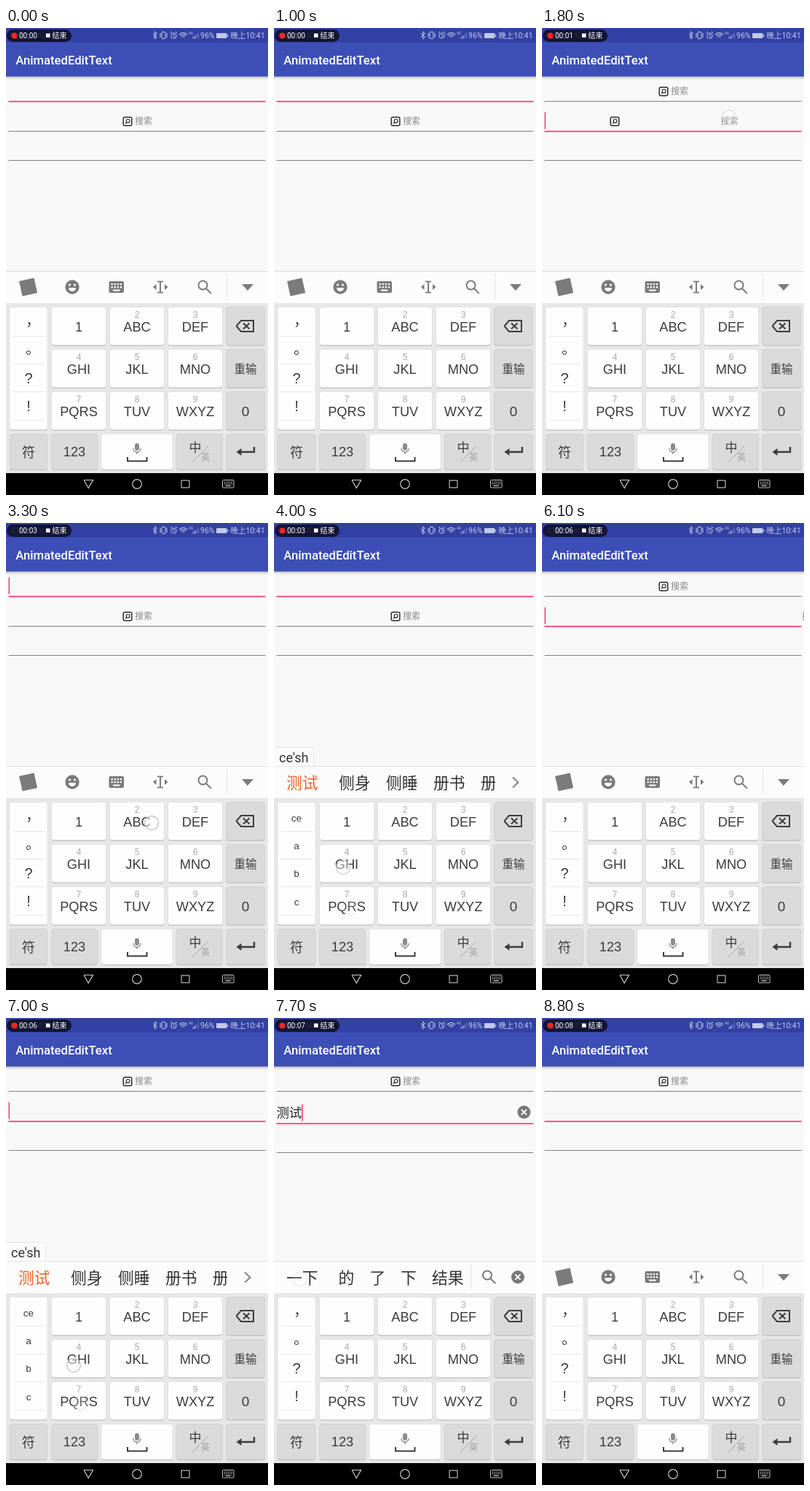
Recreate the animation shown at these times as an HTML page with a canvas. Size 360 px wide and 640 px high, loop 8.9 s.

```html
<!DOCTYPE html>
<html lang="zh-CN">
<head>
<meta charset="utf-8">
<title>AnimatedEditText</title>
<style>
html, body { margin: 0; width: 100%; height: 100%; overflow: hidden; background: #f8f8f8; }
canvas { display: block; width: 360px; height: 640px; }
</style>
</head>
<body>
<canvas id="stage"></canvas>
<script>
const LOOP = 8900, HINT_TIME = 500;
const CJK = '"Noto Sans CJK SC", "Noto Sans CJK", sans-serif';
const ARIAL = '"Liberation Sans", "Noto Sans CJK SC", "Noto Sans CJK", sans-serif';
const ROBOTO = 'Roboto, "Noto Sans CJK SC", "Noto Sans CJK", sans-serif';
const PINK = '#f83f7e', DARK = '#3c3c3c', ICON = '#7b7b7b';

const canvas = document.getElementById('stage');
const ctx = canvas.getContext('2d');
const ratio = window.devicePixelRatio || 1;
canvas.width = 360 * ratio;
canvas.height = 640 * ratio;

// Each tap: release time, effect, touch position, field index
const taps = [
  [1590, 'focus', 257, 122, 1],
  [2200, 'focus', 236, 87, 0],
  [3360, 'key', 200, 411],
  [3560, 'key', 266, 413],
  [3760, 'key', 104, 528],
  [3950, 'key', 95, 472],
  [4400, 'pick', 28, 360],
  [5050, 'clear', 343, 88],
  [5620, 'focus', 250, 126, 1],
  [6420, 'key', 190, 412],
  [6610, 'key', 262, 413],
  [6800, 'key', 102, 528],
  [6980, 'key', 93, 476],
  [7460, 'pick', 36, 358],
  [8000, 'clear', 343, 128]
];

// What the input method offers after 1 to 4 keys
const phrases = ['测试', '侧身', '侧睡', '册书', '册'];
const composing = [
  { typed: 'a', words: ['啊', '不', '才', '从', '把'], side: ['a', 'b', 'c', '2'] },
  { typed: 'ce', words: ['测', '册', '侧', '策', '厕'], side: ['ce', 'a', 'b', 'c'] },
  { typed: "ce's", words: phrases, side: ['ce', 'a', 'b', 'c'] },
  { typed: "ce'sh", words: phrases, side: ['ce', 'a', 'b', 'c'] }
];

function stateAt(t) {
  const s = { focus: 0, focusedAt: -1e4, blinkFrom: 200, keys: 0, text: ['', '', ''], suggest: false };
  for (const [at, effect, , , field] of taps) {
    if (at > t) break;
    if (effect === 'key') { s.keys++; continue; }
    s.blinkFrom = at;
    if (effect === 'focus') { s.focus = field; s.focusedAt = at; }
    if (effect === 'pick') { s.text[s.focus] = '测试'; s.keys = 0; s.suggest = true; }
    if (effect === 'clear') { s.text[s.focus] = ''; s.suggest = false; }
  }
  return s;
}

function rect(x, y, w, h, color) {
  ctx.fillStyle = color;
  ctx.fillRect(x, y, w, h);
}
function roundRect(x, y, w, h, r, fill, stroke, width = 1) {
  ctx.beginPath();
  ctx.roundRect(x, y, w, h, r);
  paint(fill, stroke, width);
}
function circle(x, y, r, fill, stroke, width = 1) {
  ctx.beginPath();
  ctx.arc(x, y, r, 0, Math.PI * 2);
  paint(fill, stroke, width);
}
function path(points, fill, stroke, width = 1) {
  ctx.beginPath();
  for (let i = 0; i < points.length; i += 2) ctx.lineTo(points[i], points[i + 1]);
  if (fill) ctx.closePath();
  paint(fill, stroke, width);
}
function paint(fill, stroke, width) {
  if (fill) { ctx.fillStyle = fill; ctx.fill(); }
  if (stroke) { ctx.strokeStyle = stroke; ctx.lineWidth = width; ctx.stroke(); }
}
// y is the vertical middle of the glyphs
function text(str, x, y, size, color, align = 'center', family = ARIAL, weight = 400) {
  ctx.font = `${weight} ${size}px ${family}`;
  ctx.textAlign = align;
  ctx.fillStyle = color;
  ctx.fillText(str, x, y + size * 0.365);
}
function magnifier(x, y, r, color, width) {
  circle(x, y, r, null, color, width);
  path([x + r * 0.7, y + r * 0.7, x + r * 1.9, y + r * 1.9], null, color, width);
}
function closeIcon(x, y, r) {
  circle(x, y, r, '#777');
  const d = r * 0.4;
  path([x - d, y - d, x + d, y + d], null, '#fff', 2);
  path([x - d, y + d, x + d, y - d], null, '#fff', 2);
}

function drawStatusBar(t) {
  const pale = '#c3c9e9';
  rect(0, 0, 360, 20, '#3341a4');
  text('中国', 5, 10.5, 10.5, pale, 'left', CJK);
  text('40', 43, 10.5, 10.5, pale, 'left', ROBOTO);
  roundRect(1, 2, 89, 17, 8.5, 'rgba(13,15,34,.86)');
  const clock = t - 50;
  if ((clock + 1000) % 1000 >= 600) circle(11.5, 10.5, 4, '#f5291f');
  const seconds = Math.max(0, Math.floor(clock / 1000));
  text('00:0' + seconds, 18, 10.5, 10, '#fff', 'left', ROBOTO);
  rect(55, 7.5, 5.5, 5.5, '#fff');
  text('结束', 63.5, 10.5, 10, '#fff', 'left', CJK);

  path([202, 7.5, 207.5, 12.5, 204.7, 15, 204.7, 5, 207.5, 7.5, 202, 12.5], null, pale);
  roundRect(214, 5.5, 5, 9, 1, null, pale);
  path([212, 7, 212, 13], null, pale);
  path([221, 7, 221, 13], null, pale);
  circle(230.5, 10.5, 3.7, null, pale);
  path([230.5, 8, 230.5, 10.8, 232.5, 11.5], null, pale);
  path([226, 7, 228, 5], null, pale);
  path([233, 5, 235, 7], null, pale);
  for (const r of [2.5, 5, 7.5]) {
    ctx.beginPath();
    ctx.arc(243.5, 14, r, -Math.PI * 0.77, -Math.PI * 0.23);
    paint(null, pale, 1.2);
  }
  text('4G', 251, 7.5, 5, pale, 'left', ROBOTO);
  for (let i = 0; i < 4; i++) rect(256.5 + i * 2.4, 12.5 - i * 2, 1.3, 2 + i * 2, i < 2 ? pale : '#6974bf');
  text('96%', 267, 10.5, 10.5, pale, 'left', ROBOTO);
  roundRect(289, 7, 14.5, 7, 1, pale);
  rect(304, 9, 1.3, 3, pale);
  text('晚上10:41', 308.5, 10.5, 10.5, pale, 'left', ROBOTO);
}

function drawAppBar() {
  const shade = ctx.createLinearGradient(0, 66, 0, 71);
  shade.addColorStop(0, 'rgba(0,0,0,.22)');
  shade.addColorStop(1, 'rgba(0,0,0,0)');
  rect(0, 66, 360, 5, shade);
  rect(0, 20, 360, 46.5, '#3c4fb6');
  text('AnimatedEditText', 13.3, 44, 16.67, '#fff', 'left', ROBOTO, 500);
}

function drawHint(y, split) {
  const x = 167 - 177 * split;
  roundRect(x - 5.8, y - 5.8, 11.6, 11.6, 2, null, '#2e2e2e', 1.5);
  circle(x + 0.6, y - 0.6, 2.4, null, '#2e2e2e', 1.2);
  path([x - 1.2, y + 1.2, x - 3, y + 3], null, '#2e2e2e', 1.3);
  text('搜索', 177 + 181 * split, y, 12, '#898989', 'left', CJK);
}

function drawFields(t, s) {
  let shift = 0;
  [100, 141, 181].forEach((base, i) => {
    const focused = s.focus === i, value = s.text[i];
    if (value) shift = 3;
    const line = base + shift;
    if (focused) rect(3.5, line - 0.2, 353, 1.8, PINK);
    else rect(3.5, line, 353, 1, '#818181');

    if (value) {
      text(value, 3.5, line - 14.5, 17.3, '#262626', 'left', CJK);
      closeIcon(343.5, line - 15, 9);
    } else if (i < 2) {
      const p = focused ? Math.min(1, (t - s.focusedAt) / HINT_TIME) : 0;
      if (p < 1) drawHint(line - 13, (1 - Math.cos(Math.PI * p)) / 2);
    }
    const phase = (t - s.blinkFrom + 1000) % 1000;
    if (focused && phase < 500) rect(value ? 38 : 3.5, line - 25.5, 1.6, 23, PINK);
  });
}

function drawToolbar() {
  ctx.save();
  ctx.translate(30.5, 355);
  ctx.rotate(-0.22);
  rect(-10.5, -10.5, 21, 21, ICON);
  ctx.restore();

  circle(91, 355, 9.7, ICON);
  circle(87.5, 352, 1.6, '#fff');
  circle(94.5, 352, 1.6, '#fff');
  ctx.beginPath();
  ctx.arc(91, 356, 5, 0, Math.PI);
  paint('#fff');

  roundRect(141.5, 347, 20.5, 16, 2, ICON);
  for (let row = 0; row < 2; row++)
    for (let col = 0; col < 4; col++) rect(144.5 + col * 4.1, 350 + row * 4, 2.3, 2.2, '#fff');
  rect(147, 358.5, 9.5, 2, '#fff');

  path([212, 348, 212, 362], null, ICON, 2);
  for (const y of [347.5, 362.5]) path([208, y, 216, y], null, ICON, 1.8);
  path([202, 355, 206.5, 351, 206.5, 359], ICON);
  path([222.5, 355, 218, 351, 218, 359], ICON);

  magnifier(270.5, 352.5, 6, ICON, 2);
  rect(303, 337, 1, 36, '#e2e2e2');
  path([324, 351, 340, 351, 332, 360], ICON);
}

function drawWords(words, xs, firstColor, right) {
  ctx.save();
  ctx.beginPath();
  ctx.rect(0, 334, right, 43);
  ctx.clip();
  words.forEach((word, i) => text(word, xs[i], 356, 21.8, i ? '#333' : firstColor, 'left', CJK));
  ctx.restore();
}

function drawInputBar(s) {
  rect(0, 333, 360, 44, '#fcfcfc');
  rect(0, 333, 360, 1, '#dedede');
  if (s.keys) {
    const { typed, words } = composing[s.keys - 1];
    ctx.font = `18px ${ROBOTO}`;
    const width = ctx.measureText(typed).width + 14;
    roundRect(-3, 307.5, width + 3, 26, 3, '#fbfbfb', '#e6e6e6');
    text(typed, 7, 321, 18, '#333', 'left', ROBOTO);
    const wide = words[0].length > 1;
    drawWords(words, wide ? [17, 89, 154, 219, 284] : [17, 67, 117, 167, 217], '#ef612b', 304);
    path([328, 348.5, 335.5, 355.5, 328, 362.5], null, '#858585', 2);
  } else if (s.suggest) {
    drawWords(['一下', '的', '了', '下', '结果'], [17, 88.5, 131.5, 174, 217], '#333', 270);
    rect(270, 337, 1, 36, '#e2e2e2');
    magnifier(293, 352.5, 6, ICON, 2);
    closeIcon(335, 355, 9);
  } else {
    drawToolbar();
  }
}

function key(x, y, w, h, gray) {
  roundRect(x, y + 1.2, w, h, 3.5, '#bdbdbd');
  roundRect(x, y, w, h, 3.5, gray ? '#dadada' : '#fdfdfd', gray ? '#cecece' : '#dfdfdf', 0.7);
}

function drawKeyboard(s) {
  rect(0, 377, 360, 233, '#e7e7e7');

  key(5, 382.5, 52, 168);
  const side = s.keys ? composing[s.keys - 1].side : ['，', '。', '?', '!'];
  side.forEach((label, i) => {
    const y = 403 + i * 38.2;
    if (s.keys) text(label, 31, y + 1, 13.5, DARK);
    else if (i < 2) text(label, 37, y - 2, 20, DARK, 'center', CJK);
    else text(label, 31, y, 20, DARK);
    rect(9, Math.round(422 + i * 38.2), 45, 1, '#e8e8e8');
  });

  ['1', 'ABC', 'DEF', 'GHI', 'JKL', 'MNO', 'PQRS', 'TUV', 'WXYZ'].forEach((label, i) => {
    const x = 62.5 + (i % 3) * 80, y = 382.5 + Math.floor(i / 3) * 58;
    key(x, y, 75, 52);
    text(label, x + 37.5, y + 27, 18.2, DARK);
    if (i) text(i + 1, x + 37.5, y + 10, 12, '#a9a9a9');
  });

  for (let row = 0; row < 3; row++) key(302.5, 382.5 + row * 58, 53.5, 52, true);
  path([316.5, 408.5, 323, 401, 340, 401, 340, 416, 323, 416, 316.5, 408.5], null, DARK, 2);
  path([326, 404.5, 334.5, 412.5], null, DARK, 2);
  path([326, 412.5, 334.5, 404.5], null, DARK, 2);
  text('重输', 329, 467, 15.5, DARK, 'center', CJK);
  text('0', 329, 525, 19, DARK);

  key(5, 556.5, 52, 48.5, true);
  text('符', 31, 581, 18, DARK, 'center', CJK);
  key(62.5, 556.5, 63.5, 48.5, true);
  text('123', 94, 580.5, 18.2, DARK);

  key(131, 556.5, 98, 48.5);
  roundRect(177, 569, 6, 10, 3, '#8b8b8b');
  ctx.beginPath();
  ctx.arc(180, 576, 5.2, 0, Math.PI);
  paint(null, '#8b8b8b', 1.3);
  path([180, 581, 180, 584], null, '#8b8b8b', 1.5);
  path([167, 588, 167, 593.5, 193.5, 593.5, 193.5, 588], null, DARK, 2);

  key(234, 556.5, 63.5, 48.5, true);
  text('中', 260, 575, 17, DARK, 'center', CJK);
  path([256, 595, 278, 573], null, '#a5a5a5', 1);
  text('英', 274, 589, 12, '#a0a0a0', 'center', CJK);

  key(302.5, 556.5, 53.5, 48.5, true);
  path([341, 574, 341, 581, 322, 581], null, DARK, 2.4);
  path([316.5, 581, 323.5, 576, 323.5, 586], DARK);
}

function drawNavigation() {
  const gray = '#c9c9c9';
  rect(0, 610, 360, 30, '#000');
  path([107, 619.5, 119.5, 619.5, 113.2, 630.5, 107, 619.5], null, gray, 1.2);
  circle(180, 625, 6.3, null, gray, 1.2);
  rect(240.5, 619.5, 12, 11, gray);
  rect(241.6, 620.6, 9.8, 8.8, '#000');
  roundRect(297.5, 619.5, 15.5, 10.5, 1, null, gray, 1);
  for (let row = 0; row < 2; row++)
    for (let col = 0; col < 5; col++) rect(299.6 + col * 2.5, 621.7 + row * 2.3, 1.4, 1.3, gray);
  rect(301.5, 626.7, 7.5, 1.3, gray);
}

function drawTouches(t) {
  for (const [at, , x, y] of taps) {
    const age = t - at;
    if (age < -80 || age > 270) continue;
    ctx.globalAlpha = age < 0 ? 0.9 : 0.9 * (1 - age / 350);
    circle(x, y, 9.5, 'rgba(255,255,255,.55)', '#bfc0c8', 1.4);
    ctx.globalAlpha = 1;
  }
}

function draw(t) {
  const s = stateAt(t);
  ctx.setTransform(ratio, 0, 0, ratio, 0, 0);
  rect(0, 0, 360, 640, '#f8f8f8');
  drawAppBar();
  drawStatusBar(t);
  drawFields(t, s);
  drawInputBar(s);
  drawKeyboard(s);
  drawNavigation();
  drawTouches(t);
}

const start = performance.now();
function frame() {
  draw((performance.now() - start) % LOOP);
  requestAnimationFrame(frame);
}
frame();
</script>
</body>
</html>
```
